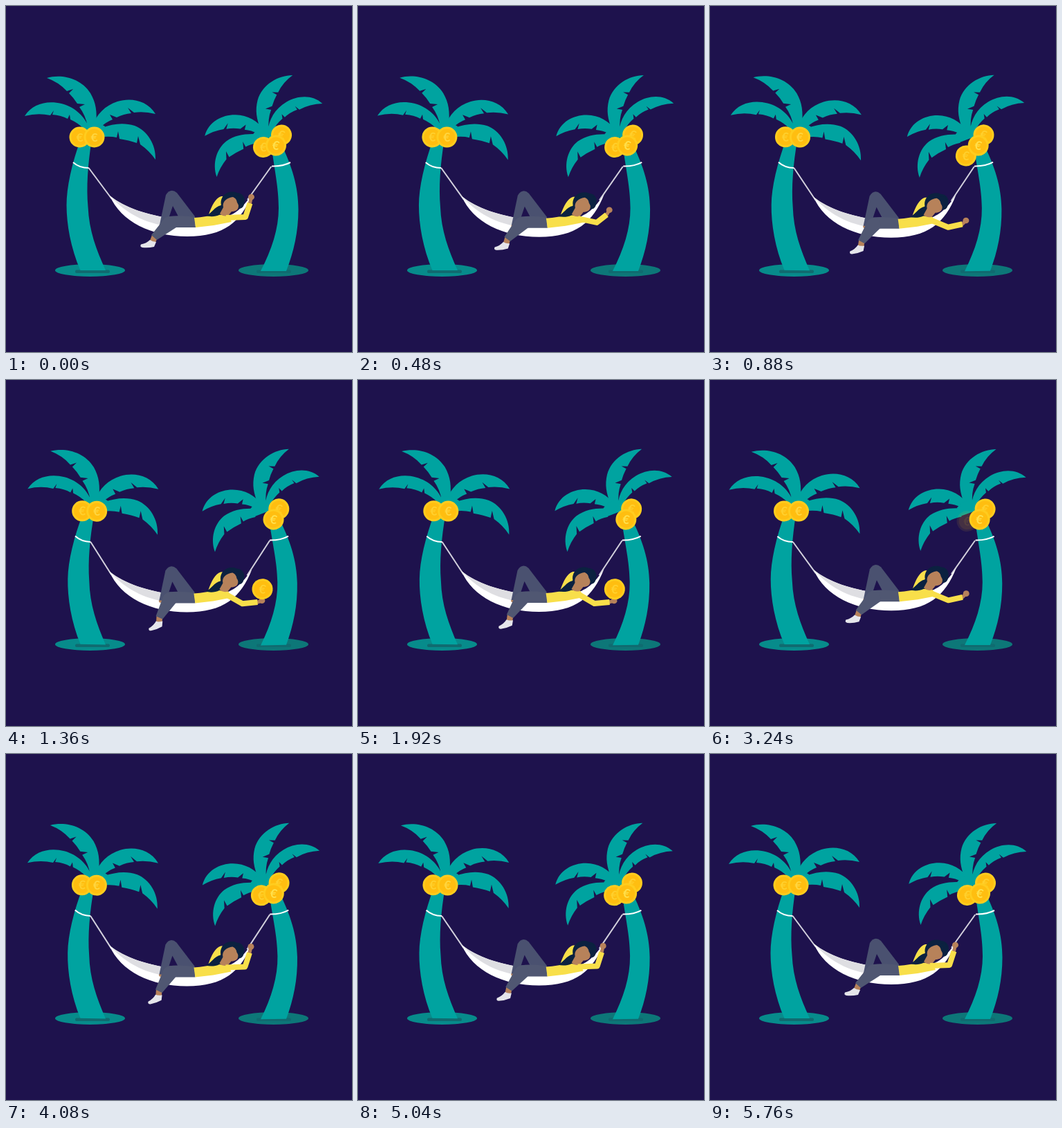
Write an HTML page with a canvas that moves like this. It is 500 px wide and 500 px high and loops after 5800 ms.

```html
<!DOCTYPE html>
<html lang="en">
<head>
<meta charset="utf-8">
<title>Hammock</title>
<style>
html, body { margin: 0; width: 100%; height: 100%; overflow: hidden; background: #1e124d; }
canvas { display: block; }
</style>
</head>
<body>
<canvas id="stage" width="500" height="500"></canvas>
<script>
const ctx = document.getElementById('stage').getContext('2d');
const LOOP = 5800, SWAY = LOOP / 2;
const BG = '#1e124d', TEAL = '#00a3a0', SHADE = '#106b70';
const YELLOW = '#f8df4a', SKIN = '#b7825a', HAIR = '#0b2140', PANTS = '#505772', BACK_LEG = '#4a5170';

const clamp = x => Math.min(1, Math.max(0, x));
const span = (t, from, to) => clamp((t - from) / (to - from));
const ease = (t, from, to) => { const x = span(t, from, to); return x * x * (3 - 2 * x); };
const lerp = (a, b, k) => a + (b - a) * k;

const leaves = [
  'M59 104C80 98 108 104 122 126C130 140 132 152 130 174L118 174Q115 158 106 146L114 142L103 141Q98 133 91 126L97 120L88 123Q76 110 59 104Z',
  'M27 159C38 141 60 136 80 141C100 146 114 160 120 176L112 177Q104 169 93 164L92 157L89 163Q80 158 67 157L69 151L64 158Q46 154 27 159Z',
  'M216 156C204 136 180 132 161 138C143 144 131 156 124 175L137 175Q144 168 154 164L150 157L160 161Q170 156 181 155L176 147L185 154Q200 152 216 156Z',
  'M216 222C217 200 204 180 186 173C170 168 155 170 138 176L140 189Q152 188 160 190L162 181L164 192Q178 194 189 198L191 188L194 200Q207 209 216 222Z',
  'M112 174L118 168L133 168L143 174L141 188L112 186Z'
].map(d => new Path2D(d));

const leftTrunk = 'M107.5 382C93.5 350 87.5 315 87.5 288C87.5 262 95 228 108 192L124 192C118 230 116 262 118.5 290C120 325 130.5 352 144 382Z';
const rightTrunk = 'M368 383C384 352 394 322 394 292C394 262 388 238 383 198L396 196C414 232 422.5 262 422.5 294C422.5 326 416 355 405 383Z';

function fill(d, color) {
  ctx.fillStyle = color;
  ctx.fill(d instanceof Path2D ? d : new Path2D(d));
}

function stroke(d, color, width) {
  ctx.strokeStyle = color;
  ctx.lineWidth = width;
  ctx.stroke(new Path2D(d));
}

function disc(x, y, rx, ry, color) {
  ctx.fillStyle = color;
  ctx.beginPath();
  ctx.ellipse(x, y, rx, ry, 0, 0, 7);
  ctx.fill();
}

function group(draw) {
  ctx.save();
  draw();
  ctx.restore();
}

function turn(x, y, degrees) {
  ctx.translate(x, y);
  ctx.rotate(degrees * Math.PI / 180);
  ctx.translate(-x, -y);
}

function coin(x, y, tilt, ink, alpha = 1) {
  group(() => {
    ctx.globalAlpha = alpha;
    ctx.translate(x, y);
    ctx.rotate(tilt);
    disc(0, 0, 15, 15, '#ffcc1e');
    disc(0, 0, 12, 12, '#ffbe10');
    ctx.font = 'bold 17.5px Lato, sans-serif';
    ctx.textAlign = 'center';
    ctx.fillStyle = ink;
    ctx.fillText('€', 0, 6.2);
  });
}

function ground(x, shadowX, color) {
  disc(x, 382, 50.5, 9, color);
  ctx.fillStyle = SHADE;
  ctx.beginPath();
  ctx.roundRect(shadowX, 381.5, 50, 4.5, 2);
  ctx.fill();
}

function crown() {
  leaves.forEach(leaf => fill(leaf, TEAL));
}

function leftTree(s) {
  ground(121.5, 100, '#078b8b');
  group(() => {
    turn(122, 382, 1.1 * s);
    fill(leftTrunk, TEAL);
    crown();
    coin(106.5, 189.5, 0, '#ffd02e');
    coin(127.5, 189.5, 0, '#ffd640');
    stroke('M97 226Q106 234 119.5 234', '#fff', 2);
  });
}

function rightTree(s, t) {
  ground(386.5, 362, '#0d7778');
  group(() => {
    turn(388, 382, -1.1 * s);
    fill(rightTrunk, TEAL);
    group(() => {
      ctx.translate(375.4, 183.4);
      ctx.rotate(-16.3 * Math.PI / 180);
      ctx.scale(-.933, .933);
      ctx.translate(-124, -178);
      crown();
    });
    stroke('M384 231.5Q400 232 411 226', '#fff', 2);
    coin(398, 186.5, .2, '#ffd02e');
    looseCoin(s, t);
    coin(390, 201.5, .2, '#ffe04c');
  });
}

// Drops into the hand, fades there, then grows back on the tree.
function looseCoin(s, t) {
  const regrown = t > 3050;
  const drop = span(t, 700, 1190) ** 2;
  const held = 292 + 8 * ease(t, 1190, 1400) + 2.6 * s;
  const y = regrown ? 204 : lerp(204, held, drop);
  const alpha = regrown ? ease(t, 3160, 3600) : 1 - ease(t, 2600, 2900);
  if (alpha > 0) coin(372, y, .15, '#ffd02e', alpha);
}

function ropes(s) {
  const dy = 2.6 * s;
  stroke(`M${119.5 + 2.8 * s} 234L${153 - .6 * s} ${279 + dy}`, '#d3d1dd', 2);
  stroke(`M${383.3 - 2.2 * s} 232L${349 - .6 * s} ${280 + dy}`, '#d3d1dd', 2);
}

function hammock() {
  fill('M150 274C172 292 205 302 240 307L310 307C330 303 342 292 356 271C340 312 315 333 262 333C210 333 166 312 150 274Z', '#fff');
  fill('M151 275C172 292 205 302 240 307L240 319C208 316 176 303 151 275Z', '#dedee2');
}

function legs(s) {
  disc(225.5, 317, 4, 2.5, SKIN);
  fill('M222 316L231 273Q238 262 247 270L273 304L272 318Z', BACK_LEG);
  fill('M241 289L236 304L249 304Z', BG);
  fill('M274 320L273 305Q250 302 236 304Q229 306 228 312L245 320Z', PANTS);
  group(() => {
    turn(238, 312, -18 * s);
    fill('M211 331L218 337L216 342L208 339Z', SKIN);
    fill('M208 338Q212 341 217 341L214 348Q205 350 197 349Q193 348 195 344.5Q203 343 208 338Z', '#e5e5ea');
    fill('M229 307L210 331L218 338L246 320Q248 304 238 304Q232 304 229 307Z', PANTS);
  });
}

function torso() {
  fill('M293 301C297 289 303 277 311 275L320 275L314 283L303 299Z', YELLOW);
  fill('M272 306Q290 304.5 304 301L322 303L326 312L300 317L274 320Z', YELLOW);
  fill('M311 288C308 273 323 265 334 270C343 270 347 279 344 286C343 293 337 294 333 291L317 294C313 303 299 306 289 303C297 300 301 290 311 288Z', HAIR);
  fill('M314 291C312 282 320 277 328 276C333 278 336 283 336 289C336 295 331 297 326 297L321 303Q314 305 309 300Z', SKIN);
  fill('M328 275Q333 278 334 284L338 291Q344 290 344 284L340 273Z', HAIR);
}

// Poses run shoulder, elbow, wrist, hand.
const armUp = [318, 306, 346, 305, 352.5, 285, 354.5, 276];
const armOut = [318, 307, 344.5, 318, 365, 313.5, 370.3, 308.3];
const armLoaded = [318, 307, 342, 321, 364, 319, 370.5, 317];

function arm(t) {
  const out = ease(t, 200, 720) - ease(t, 3350, 3950);
  const load = ease(t, 1190, 1400) - ease(t, 2600, 2950);
  const [x0, y0, x1, y1, x2, y2, x3, y3] =
    armUp.map((v, i) => lerp(lerp(v, armOut[i], out), armLoaded[i], load));
  ctx.lineCap = 'round';
  stroke(`M${x2} ${y2}L${x3} ${y3}`, SKIN, 5);
  disc(x3, y3, 4.5, 4.3, SKIN);
  ctx.lineCap = 'butt';
  ctx.lineJoin = 'round';
  stroke(`M${x0} ${y0}L${x1} ${y1}L${x2} ${y2}`, YELLOW, 8);
}

function draw(t) {
  const s = (1 - Math.cos(2 * Math.PI * t / SWAY)) / 2;
  ctx.fillStyle = BG;
  ctx.fillRect(0, 0, 500, 500);
  ropes(s);
  group(() => {
    ctx.translate(-.6 * s, 2.6 * s);
    hammock();
    legs(s);
    torso();
    arm(t);
  });
  leftTree(s);
  rightTree(s, t);
}

const start = performance.now();
function tick() {
  draw((performance.now() - start) % LOOP);
  requestAnimationFrame(tick);
}
tick();
</script>
</body>
</html>
```
